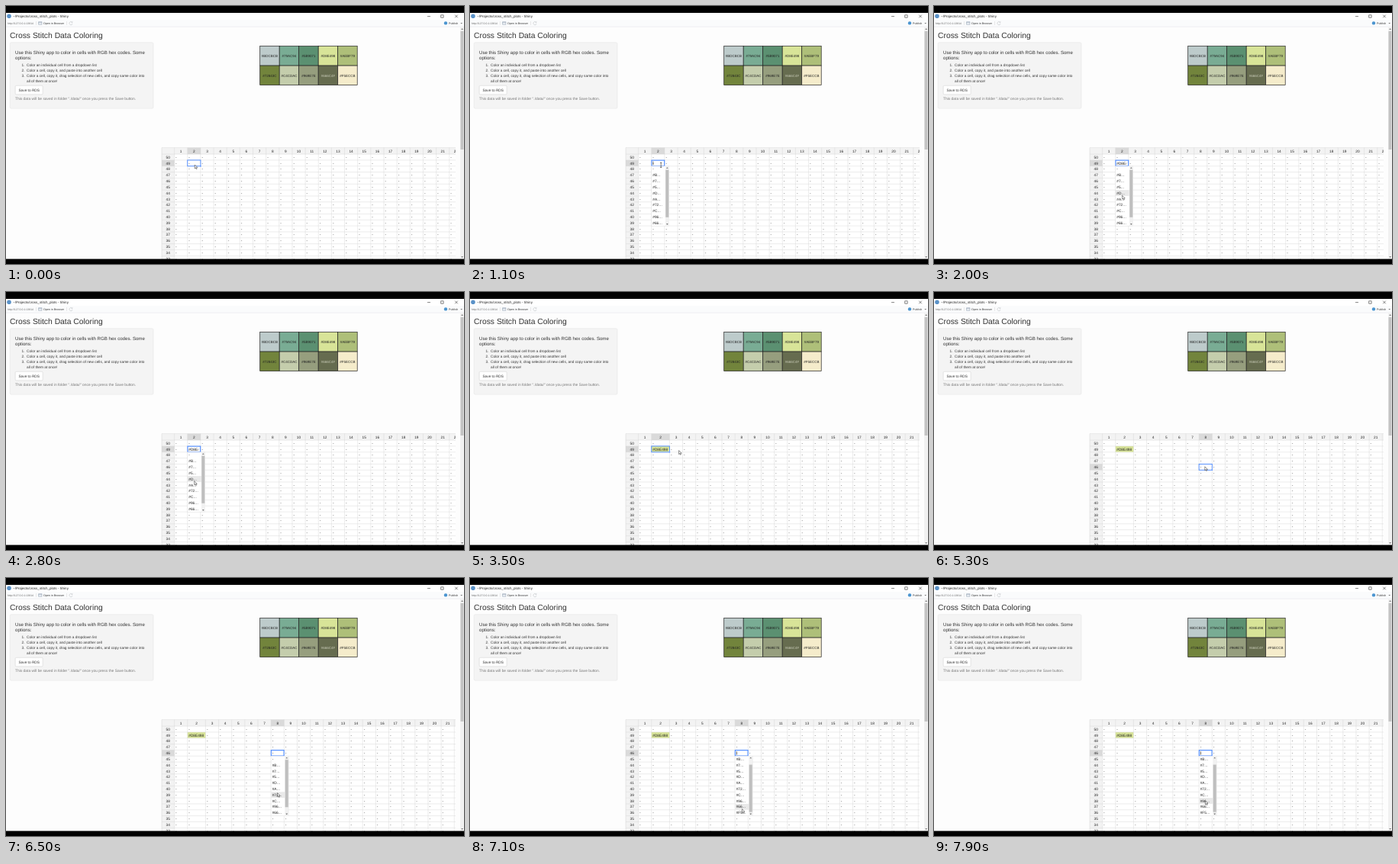
These frames come from a looping animation (600 px wide and 338 px high, 8 s). An HTML page:

```html
<!DOCTYPE html>
<html lang="en">
<head>
<meta charset="utf-8">
<title>Cross Stitch Data Coloring</title>
<style>
  html, body { margin: 0; width: 100%; height: 100%; overflow: hidden; background: #fff; }
  svg { display: block; width: 100vw; height: 100vh; }
  text { font-family: "Liberation Sans", Arial, sans-serif; text-rendering: geometricPrecision; white-space: pre; }
</style>
</head>
<body>
<svg viewBox="0 0 600 338">
  <defs>
    <clipPath id="view"><rect x="203" y="185" width="386" height="147"/></clipPath>
    <clipPath id="cell"><rect id="cellBox" height="7.8"/></clipPath>
  </defs>
  <g id="page"></g>
  <g id="sheet" clip-path="url(#view)"></g>
  <g id="popup"></g>
  <g id="pointer"></g>
  <g id="bars"></g>
</svg>
<script>
const LOOP = 8000, STEP = 100;
const ROW = 7.83, COL = 17.15, LEFT = 204, CELLS = 220.6, HEAD = 185.6, BODY = 194.1;
const WIDEN_AT = 3000;
const COLORS = ['#BDCBCB', '#79AC94', '#5B9071', '#D8E498', '#AEBF79',
                '#72843C', '#C4CDAC', '#969E7E', '#666C4F', '#F5ECCB'];
const OPTIONS = ['-', '#B…', '#7…', '#5…', '#D…', '#A…', '#72…', '#C…', '#96…', '#66…', '#F5…'];

// time, x, y of the pointer; it jumps from one place to the next
const MOVES = [
  [0, 247.3, 208], [100, 247.5, 208.2], [400, 250, 208.6], [600, 248.5, 208.2],
  [900, 250.2, 208.2], [1400, 248.5, 208.4], [1600, 246, 246.8], [1900, 246.6, 248.2],
  [2300, 246.7, 247.8], [2900, 252, 242], [3100, 268, 222], [3300, 278.6, 210.6],
  [3500, 273.6, 207.6], [3700, 258, 205.4], [3900, 248.2, 206.4],
  [4100, 256, 207.5], [4300, 283, 214], [4500, 318, 222], [4700, 346, 228], [4900, 354.8, 230.2],
  [5300, 354.8, 228.8], [5800, 355, 230], [6100, 356, 267], [6300, 355.6, 278], [6500, 355.6, 281.6],
  [6700, 356, 294], [6900, 356.4, 302.6], [7400, 356, 298], [7600, 355.5, 294], [7900, 355.4, 291.8]
];

const $ = id => document.getElementById(id);
const rect = (x, y, w, h, fill, more = '') =>
  `<rect x="${x}" y="${y}" width="${w}" height="${h}" fill="${fill}" ${more}/>`;
const text = (x, y, size, s, fill = '#333', more = '') =>
  `<text x="${x}" y="${y}" font-size="${size}" fill="${fill}" ${more}>${s}</text>`;
const path = (d, stroke, width = 0.5, fill = 'none') =>
  `<path d="${d}" stroke="${stroke}" stroke-width="${width}" fill="${fill}"/>`;
const MID = 'text-anchor="middle"';
const last = (list, t) => list.filter(k => k[0] <= t).pop();

function drawWindow() {
  let s = rect(0, 0, 600, 338, '#fdfdfd') + rect(0, 9, 600, 9, '#fff');
  s += '<circle cx="4" cy="13.3" r="2.8" fill="#5a92c8"/>';
  s += text(9, 15.3, 4.54, '~/Projects/cross_stitch_plots - Shiny', '#222');
  s += path('M552 13.6h4', '#333', 0.6) + path('M569.7 11.8h3.4v3.4h-3.4z', '#333', 0.6);
  s += path('M588.2 11.7l3.6 3.6m0 -3.6l-3.6 3.6', '#333', 0.6);
  s += rect(0, 18, 600, 9, '#fafbfc') + path('M0 27.2H600', '#dcdfe2', 0.5);
  s += text(2, 23.8, 3.5, 'http://127.0.0.1:13814', '#666');
  s += path('M39.5 20v5M79.5 20v5', '#ccc', 0.4);
  s += path('M42.6 20.7h4.4v3.6h-4.4zM42.6 21.7h4.4', '#89a', 0.5, '#eef2f6');
  s += text(49, 23.8, 3.63, 'Open in Browser', '#333');
  s += path('M86.6 21.2a2.1 2.1 0 1 0 .5 1.9M87 20.2v1.5h-1.5', '#b4b9bd', 0.5);
  s += '<circle cx="576" cy="22.4" r="2.2" fill="#4a94d0"/>';
  s += text(580, 23.8, 3.66, 'Publish', '#333');
  s += path('M595.4 21.9h2.6l-1.3 1.6z', 'none', 0, '#777');

  s += rect(595, 27.5, 5, 304, '#f1f1f1') + rect(595.5, 33, 4, 155, '#c3c3c3');
  s += path('M596.2 31l1.4-1.7 1.4 1.7z', 'none', 0, '#777');
  s += path('M596.2 328l1.4 1.7 1.4-1.7z', 'none', 0, '#777');
  return s;
}

function drawForm() {
  let s = text(5, 42, 10.35, 'Cross Stitch Data Coloring');
  s += rect(5.2, 47.8, 187.8, 86.4, '#f4f4f4', 'rx="1.6" stroke="#e0e0e0" stroke-width=".5"');
  s += text(12, 63.2, 6.13, 'Use this Shiny app to color in cells with RGB hex codes. Some');
  s += text(12, 69.9, 6.13, 'options:');
  ['1.', '2.', '3.'].forEach((n, i) => s += text(20.5, 79.3 + 6.82 * i, 4.78, n));
  ['Color an individual cell from a dropdown list',
   'Color a cell, copy it, and paste into another cell',
   'Color a cell, copy it, drag selection of new cells, and copy same color into',
   'all of them at once!'].forEach((line, i) => s += text(27, 79.3 + 6.82 * i, 4.78, line));
  s += rect(12.2, 104.3, 36, 11.6, '#fff', 'rx="1.3" stroke="#ccc" stroke-width=".5"');
  s += text(30.2, 111.8, 4.78, 'Save to RDS', '#333', MID);
  s += text(12, 122.7, 4.9, 'This data will be saved in folder "./data/" once you press the Save button.', '#777');
  return s;
}

function drawPalette() {
  return COLORS.map((c, i) => {
    const x = 332.7 + (i % 5) * 25.5, y = 52.6 + Math.floor(i / 5) * 25.5;
    return rect(x, y, 25.5, 25.5, c, 'stroke="#222" stroke-width=".7"') +
      text(x + 12.75, y + 14.4, 4.5, c, i == 8 ? '#c9cbb8' : '#222', MID);
  }).join('');
}

const colX = (n, wide) => CELLS + (n - 1) * COL + (wide && n > 2 ? 6.5 : 0);
const rowY = r => BODY + (50 - r) * ROW;

function drawSheet(wide, sel) {
  const x = n => colX(n, wide);
  let s = rect(LEFT, BODY, 386, 140, '#fff') + rect(LEFT, HEAD, 386, BODY - HEAD, '#f3f3f3');
  s += rect(LEFT, BODY, CELLS - LEFT, 140, '#f3f3f3');
  s += rect(x(sel.col), HEAD, x(sel.col + 1) - x(sel.col), BODY - HEAD, '#dadada');
  s += rect(LEFT, rowY(sel.row), CELLS - LEFT, ROW, '#dadada');
  if (wide) s += rect(x(2), rowY(49), x(3) - x(2), ROW, '#D8E498');
  let lines = `M${LEFT} ${HEAD}H590M${LEFT} ${HEAD}V338`;
  for (let n = 1; n <= 22; n++) {
    lines += `M${x(n)} ${HEAD}V338`;
    s += text((x(n) + x(n + 1)) / 2, 191.6, 4.78, n, '#222', MID);
  }
  for (let r = 50; r >= 33; r--) {
    const y = rowY(r);
    lines += `M${LEFT} ${y}H590`;
    s += text(212.2, y + 5.6, 4.78, r, '#222', MID);
    for (let n = 1; n <= 22; n++) {
      const filled = wide && r == 49 && n == 2;
      s += text(x(n) + 1.5, y + 5.6, 4.78, filled ? '#D8E498' : '-', '#222');
    }
  }
  s += path(lines, '#d4d4d4', 0.45);
  if (sel.on) {
    const l = x(sel.col), w = x(sel.col + 1) - l, y = rowY(sel.row);
    s += rect(l, y, w, ROW, 'none', 'stroke="#4b89ff" stroke-width=".9"');
    s += rect(l + w - 1.2, y + ROW - 1.2, 2, 2, '#4b89ff', 'stroke="#fff" stroke-width=".3"');
  }
  return s;
}

function drawEditor(box, t, cursor) {
  const l = colX(box.col, box.wide), y = rowY(box.row), top = y + ROW;
  const hover = Math.floor((cursor[2] - top) / ROW);
  const caret = !box.value && Math.floor((t - box.from) / 500) % 2 == 0;
  $('cellBox').setAttribute('x', l);
  $('cellBox').setAttribute('y', y);
  $('cellBox').setAttribute('width', COL - 2.6);
  let s = rect(l, y, COL, ROW, '#fff');
  s += text(l + 1.5, y + 5.6, 4.78, box.value || '-', '#111', 'clip-path="url(#cell)"');
  if (caret) s += path(`M${l + 2.2} ${y + 1.7}v4.6`, '#111', 0.6);
  s += rect(l + 0.2, y + 0.2, COL - 0.4, ROW - 0.4, 'none', 'stroke="#4b89ff" stroke-width="1.1"');

  s += rect(l, top, 23, 10 * ROW, '#fff', 'stroke="#ddd" stroke-width=".4"');
  for (let i = 0; i < 10; i++) {
    const iy = top + i * ROW;
    if (i == hover) s += rect(l + 0.3, iy, 17.8, ROW, '#e9e9e9');
    s += text(l + 1.5, iy + 5.6, 4.78, OPTIONS[i + box.scroll], '#222');
  }
  s += rect(l + 18.2, top, 4.7, 10 * ROW, '#f1f1f1');
  s += rect(l + 18.5, top + 5 + box.scroll * 6.3, 4.1, 62, '#bfbfbf');
  s += path(`M${l + 19.3} ${top + 3}l1.3-1.6 1.3 1.6z`, 'none', 0, '#666');
  s += path(`M${l + 19.3} ${top + 75.3}l1.3 1.6 1.3-1.6z`, 'none', 0, '#666');
  return s;
}

function drawPointer([, x, y], beam) {
  return beam
    ? path(`M${x - 1.2} ${y - 3}h2.4M${x} ${y - 3}v6.2M${x - 1.2} ${y + 3.2}h2.4`, '#222', 0.6)
    : path(`M${x} ${y}v5l1.2-1.1 .8 1.8 .8-.4-.8-1.7h1.6z`, '#222', 0.5, '#fff');
}

function editorAt(t) {
  if (t >= 1100 && t < WIDEN_AT)
    return { col: 2, row: 49, wide: false, from: 1100, value: t >= 1900 ? '#D8E498' : '', scroll: 0 };
  if (t >= 5700)
    return { col: 8, row: 46, wide: true, from: 5700, value: '', scroll: t >= 7100 ? 1 : 0 };
  return null;
}

function draw(t) {
  const cursor = last(MOVES, t), box = editorAt(t);
  const sel = t < 4900 ? { col: 2, row: 49 } : { col: 8, row: 46 };
  sel.on = !box;
  $('sheet').innerHTML = drawSheet(t >= WIDEN_AT, sel);
  $('popup').innerHTML = box ? drawEditor(box, t, cursor) : '';
  $('pointer').innerHTML = drawPointer(cursor, t >= 900 && t < 1600);
}

$('page').innerHTML = drawWindow() + drawForm() + drawPalette();
$('bars').innerHTML = rect(0, 0, 600, 9, '#000') + rect(0, 331.4, 600, 6.6, '#000');

const start = performance.now();
let shown = -1;
function frame() {
  const t = Math.floor((performance.now() - start) % LOOP / STEP) * STEP;
  if (t != shown) draw(shown = t);
  requestAnimationFrame(frame);
}
frame();
</script>
</body>
</html>
```
